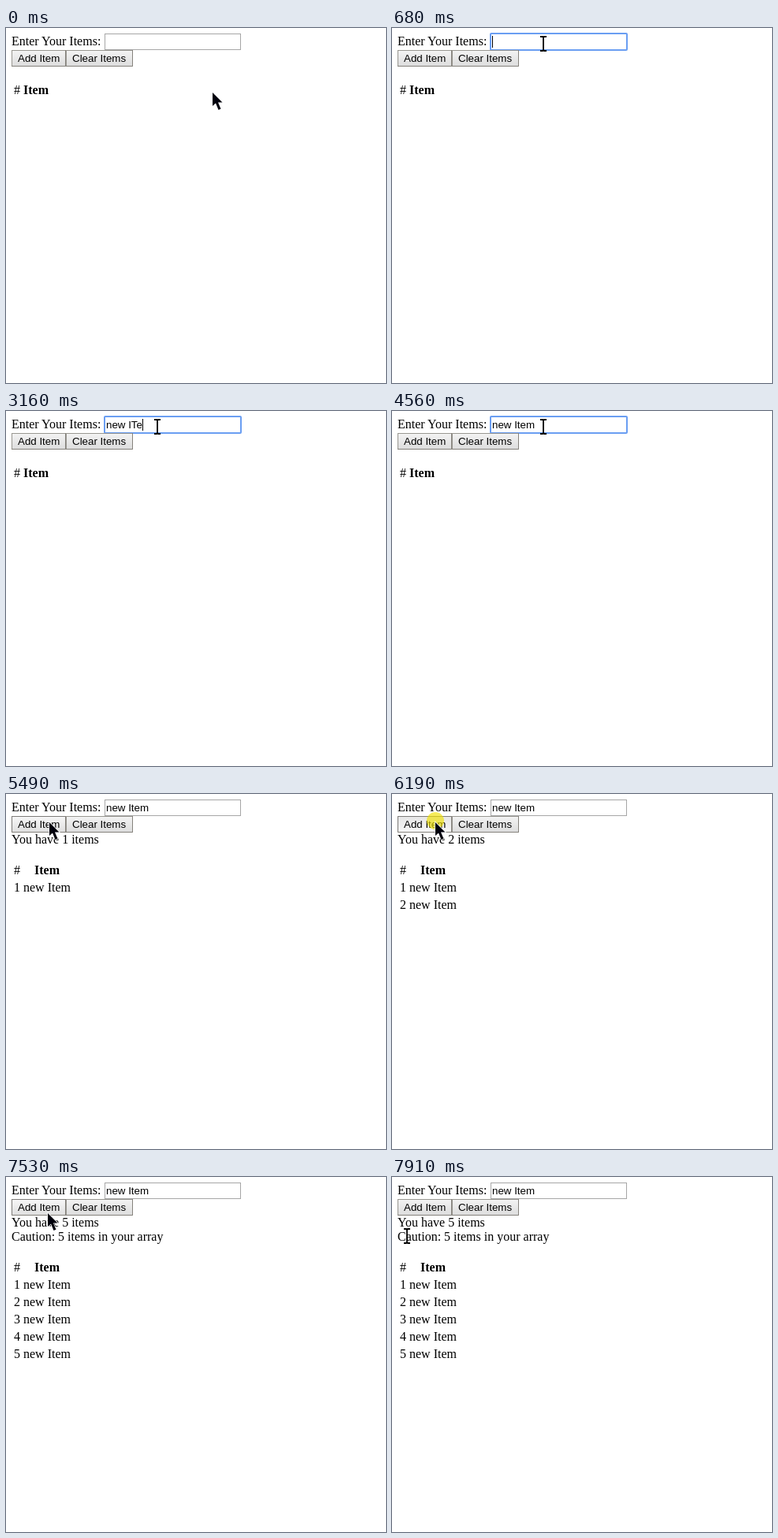
Write an HTML page that moves like this. It is 482 by 451 pixels and loops after 8000 ms.

```html
<!DOCTYPE html>
<html lang="en">
<head>
<meta charset="utf-8">
<title>Item list</title>
<style>
  html, body { margin: 0; width: 100%; height: 100%; overflow: hidden; background: #fff; }
  svg { display: block; }
  text { font: 16px "Liberation Serif", "Times New Roman", serif; white-space: pre; }
  .ui { font: 13.333px "Liberation Sans", Arial, sans-serif; }
  .bold { font-weight: bold; }
  .edge { fill: none; stroke: #999791; }
  .hover .edge { stroke: #7d7b78; }
  .face { fill: url(#up); }
  .hover .face { fill: url(#over); }
  .down .face { fill: url(#down); }
</style>
</head>
<body>
<svg width="482" height="451" viewBox="0 0 482 451">
  <defs>
    <linearGradient id="up" x2="0" y2="1"><stop stop-color="#f4f4f4"/><stop offset="1" stop-color="#dcdcdc"/></linearGradient>
    <linearGradient id="over" x2="0" y2="1"><stop stop-color="#f8f8f8"/><stop offset="1" stop-color="#dedede"/></linearGradient>
    <linearGradient id="down" x2="0" y2="1"><stop stop-color="#e6e6e6"/><stop offset="1" stop-color="#f6f6f6"/></linearGradient>
  </defs>

  <text x="7" y="22">Enter Your Items:</text>
  <rect x="125.5" y="7.5" width="172" height="20" fill="#fff" stroke="#a6a6a6"/>
  <rect id="ring" x="125" y="7" width="173" height="21" rx="1" fill="none" stroke="#6a9ef2" stroke-width="2"/>
  <text id="value" class="ui" x="127" y="22"></text>
  <rect id="caret" y="10" width="1" height="15"/>

  <g id="add">
    <rect class="face" x="7" y="28" width="69" height="21"/>
    <rect class="edge" x="7.5" y="28.5" width="68" height="20"/>
    <path d="M7 48.5H75.5V28" fill="none" stroke="#85827c"/>
    <text class="ui" x="15" y="43">Add Item</text>
  </g>
  <g id="clear">
    <rect class="face" x="76" y="28" width="85" height="21"/>
    <rect class="edge" x="76.5" y="28.5" width="84" height="20"/>
    <path d="M76 48.5H160.5V28" fill="none" stroke="#85827c"/>
    <text class="ui" x="84" y="43">Clear Items</text>
  </g>

  <text id="status" x="7" y="63"></text>
  <text id="caution" x="7" y="81">Caution: 5 items in your array</text>
  <g id="table">
    <text x="10">#</text>
    <text id="head" class="bold">Item</text>
    <g id="rows"></g>
  </g>

  <circle id="press" r="11" fill="#f0e000" fill-opacity=".65"/>
  <path id="arrow" d="M0 0V17L4 13.5L7.5 22L10.5 20.8L7 12.5H12.5Z" fill="#00000c" stroke="#fff" stroke-width="1.4" paint-order="stroke"/>
  <path id="beam" d="M-4 -9H-1L0 -8L1 -9H4M0 -8V8M-4 9H-1L0 8L1 9H4" fill="none" stroke="#000" stroke-width="1.8"/>
</svg>
<script>
const LOOP = 8000;
const $ = id => document.getElementById(id);

// time, tip x, tip y, shape
const pointer = [
  [0, 262, 82, "arrow"], [70, 258, 78, "arrow"], [140, 248, 68, "arrow"],
  [210, 234, 54, "arrow"], [280, 220, 42, "arrow"], [350, 208, 32, "arrow"],
  [420, 198, 24, "beam"], [490, 192, 20, "beam"],
  [5030, 140, 31, "arrow"], [5100, 84, 36, "arrow"], [5170, 55, 36, "arrow"],
  [7530, 53, 46, "arrow"], [7600, 46, 64, "arrow"], [7680, 36, 84, "arrow"],
  [7760, 27, 95, "arrow"], [7840, 21, 86, "beam"], [7910, 19, 75, "beam"]
];

// time, field text, caret x (0 = hidden)
const typing = [
  [0, "", 0], [590, "", 127], [1060, "", 0], [1520, "n", 134], [1690, "ne", 142],
  [1750, "new", 151], [2150, "new ", 155], [2610, "new I", 159], [2760, "new IT", 167],
  [3160, "new ITe", 173], [3390, "new IT", 167], [3550, "new I", 159],
  [3700, "new It", 163], [3790, "new Ite", 170], [4010, "new Item", 181],
  [4560, "new Item", 0], [5100, "new Item", 181], [5420, "new Item", 0]
];

const presses = [[590, 680], [5420, 5490], [5810, 5960], [6190, 6280], [6590, 6660], [6890, 7060]];
const focus = [590, 5420];

const at = (steps, t) => steps.findLast(s => s[0] <= t);
const within = ([from, to], t) => t >= from && t < to;
const show = (id, on) => $(id).setAttribute("visibility", on ? "visible" : "hidden");
const move = (id, x, y) => $(id).setAttribute("transform", `translate(${x} ${y})`);

const rows = [1, 2, 3, 4, 5].map(n => {
  const row = document.createElementNS("http://www.w3.org/2000/svg", "text");
  row.setAttribute("x", 10);
  row.setAttribute("y", 22 * n);
  row.textContent = `${n} new Item`;
  $("rows").append(row);
  return row;
});

function draw(t) {
  const [, x, y, shape] = at(pointer, t);
  const [, text, caret] = at(typing, t);
  const pressed = presses.some(p => within(p, t));
  const count = presses.slice(1).filter(p => p[1] <= t).length;

  for (const id of ["arrow", "beam"]) {
    show(id, id === shape);
    move(id, x, y);
  }
  show("press", pressed);
  move("press", x, shape === "arrow" ? y - 2 : y);

  show("ring", within(focus, t));
  $("value").textContent = text;
  show("caret", caret);
  $("caret").setAttribute("x", caret);

  const onButton = y >= 28 && y < 49 && shape === "arrow";
  const overAdd = onButton && x >= 7 && x < 76;
  $("add").setAttribute("class", overAdd ? (pressed ? "hover down" : "hover") : "");
  $("clear").setAttribute("class", onButton && x >= 76 && x < 161 ? "hover" : "");

  $("status").textContent = count ? `You have ${count} items` : "";
  show("caution", count > 4);
  move("table", 0, 84 + (count ? 18 : 0) + (count > 4 ? 18 : 0));
  $("head").setAttribute("x", count ? 36 : 22);
  rows.forEach((row, i) => row.setAttribute("visibility", i < count ? "visible" : "hidden"));
}

const start = performance.now();
function frame() {
  draw((performance.now() - start) % LOOP);
  requestAnimationFrame(frame);
}
frame();
</script>
</body>
</html>
```
